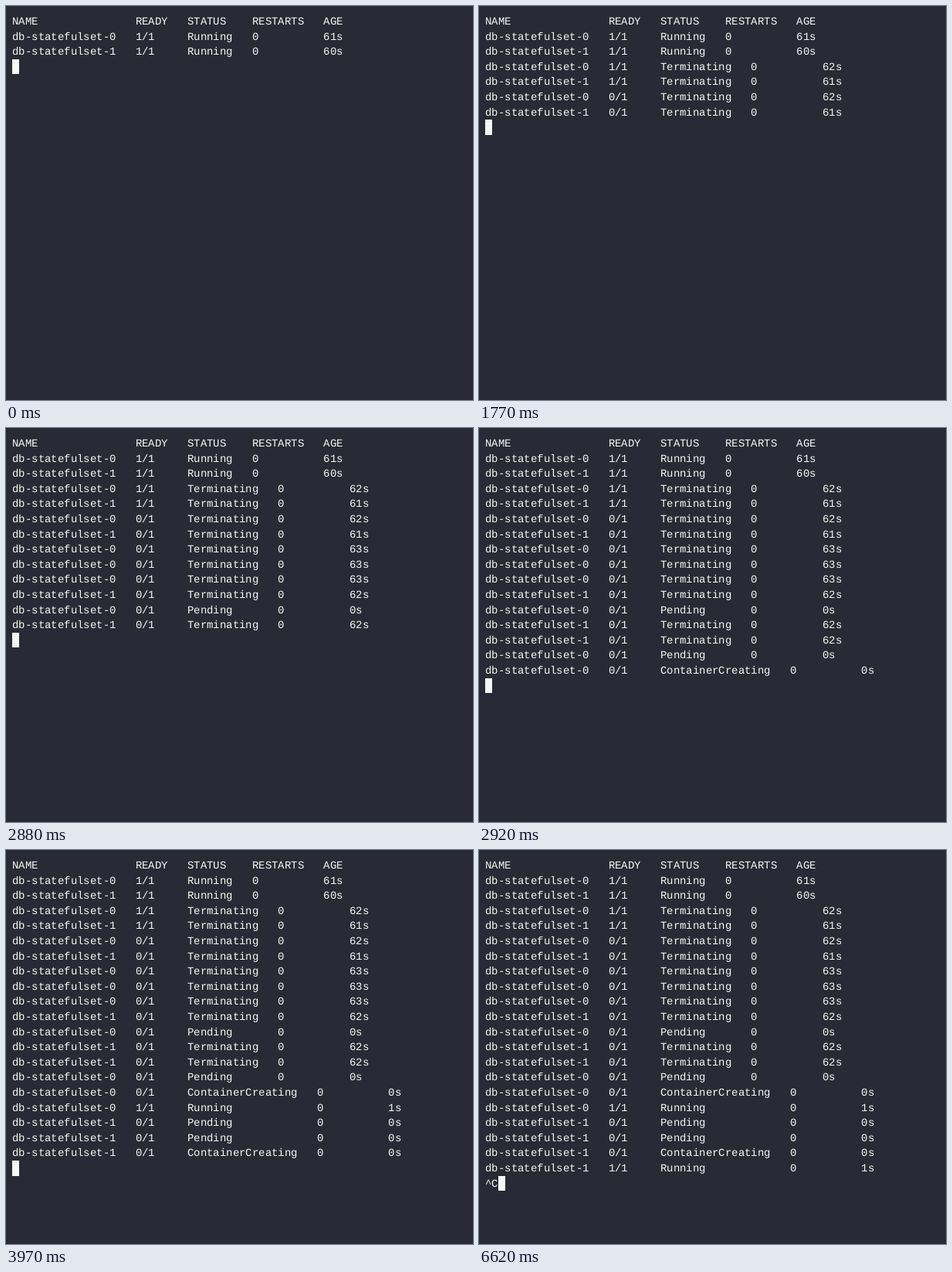
These frames come from a looping animation (605 by 510 pixels, 9620 ms). An HTML page:

```html
<!DOCTYPE html>
<html lang="en">
<head>
<meta charset="utf-8">
<title>Pod watch</title>
<style>
  html, body { margin: 0; width: 100%; height: 100%; overflow: hidden; background: #282a36; }
  svg { display: block; width: 605px; height: 510px; }
  text {
    font: 14px "Liberation Mono", monospace;
    fill: #f8f8f2;
    text-rendering: geometricPrecision;
  }
</style>
</head>
<body>
<svg id="term" viewBox="0 0 605 510"></svg>
<script>
const LOOP = 9620;
const FONT = 14, CELL_W = 8.4, CELL_H = 19.6, TOP = 10;
const svg = document.getElementById('term');

// One empty column on the left
const colX = col => CELL_W * (col + 1);
const rowY = row => TOP + Math.round(CELL_H * row);

// Column starts: narrow, wide and widest status field
const NARROW = [37, 48], WIDE = [41, 52], WIDEST = [47, 58];

function pod(id, ready, status, age, [restartCol, ageCol]) {
  return (`db-statefulset-${id}`.padEnd(19) + `${ready}/1`.padEnd(8) + status)
    .padEnd(restartCol) + '0'.padEnd(ageCol - restartCol) + age + 's';
}
const ending = (id, ready, age) => pod(id, ready, 'Terminating', age, WIDE);
const pending = (id, cols) => pod(id, 0, 'Pending', 0, cols);
const creating = id => pod(id, 0, 'ContainerCreating', 0, WIDEST);

const lines = [
  'NAME'.padEnd(19) + 'READY   STATUS    RESTARTS   AGE',
  pod(0, 1, 'Running', 61, NARROW),
  pod(1, 1, 'Running', 60, NARROW),
  ending(0, 1, 62),
  ending(1, 1, 61),
  ending(0, 0, 62),
  ending(1, 0, 61),
  ending(0, 0, 63),
  ending(0, 0, 63),
  ending(0, 0, 63),
  ending(1, 0, 62),
  pending(0, WIDE),
  ending(1, 0, 62),
  ending(1, 0, 62),
  pending(0, WIDE),
  creating(0),
  pod(0, 1, 'Running', 1, WIDEST),
  pending(1, WIDEST),
  pending(1, WIDEST),
  creating(1),
  pod(1, 1, 'Running', 1, WIDEST),
  '^C'
];

// [time in ms, printed lines]
const steps = [
  [0, 3], [1140, 4], [1190, 5], [1680, 6], [1770, 7],
  [2790, 8], [2840, 10], [2880, 13], [2920, 16],
  [3880, 18], [3930, 19], [3970, 20], [4930, 21], [6620, 22]
];

function add(parent, tag, attrs) {
  const el = document.createElementNS('http://www.w3.org/2000/svg', tag);
  for (const key in attrs) el.setAttribute(key, attrs[key]);
  return parent.appendChild(el);
}

add(svg, 'rect', { width: 605, height: 510, fill: '#282a36' });

// The minute skew keeps the glyphs unhinted
const page = add(svg, 'g', { transform: 'matrix(1 .00001 0 1 0 0)' });
const rows = lines.map((line, r) => {
  const row = add(page, 'g', {});
  for (const { 0: word, index } of line.matchAll(/\S+/g)) {
    // Each glyph sits on a whole pixel
    const xs = [...word].map((_, i) => Math.floor(colX(index + i) + 1e-6));
    add(row, 'text', { x: xs.join(' '), y: rowY(r) + FONT }).textContent = word;
  }
  return row;
});
const cursor = add(svg, 'rect', { fill: '#f8f8f2' });

function moveCursor(col, row) {
  const x = Math.round(colX(col)), y = rowY(row);
  cursor.setAttribute('x', x);
  cursor.setAttribute('y', y);
  cursor.setAttribute('width', Math.round(colX(col + 1)) - x);
  cursor.setAttribute('height', rowY(row + 1) - y);
}

let shown = -1;
function draw(time) {
  let count = 0;
  for (const [at, n] of steps) if (time >= at) count = n;
  if (count === shown) return;
  shown = count;
  rows.forEach((row, r) => row.setAttribute('visibility', r < count ? 'visible' : 'hidden'));
  if (count === lines.length) moveCursor(2, count - 1);
  else moveCursor(0, count);
}

const start = performance.now();
function tick() {
  draw((performance.now() - start) % LOOP);
  requestAnimationFrame(tick);
}
tick();
</script>
</body>
</html>
```
